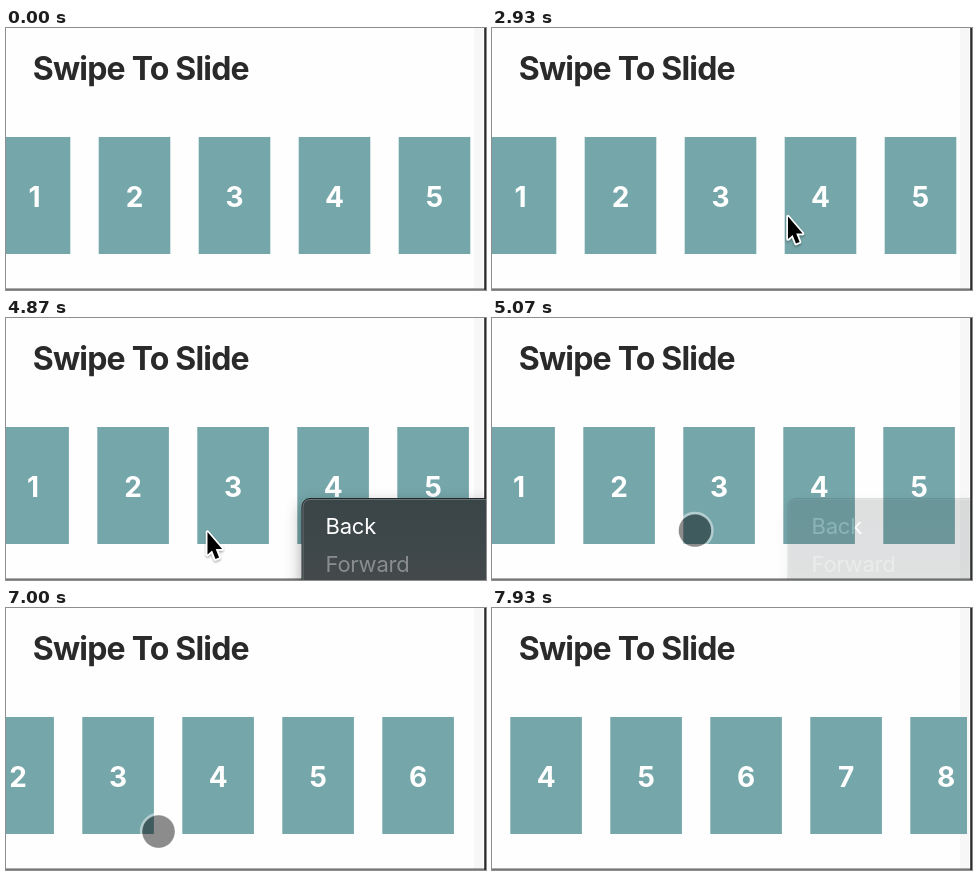
An HTML page that plays this animation: 480x262 px, repeating every 8000 ms.

```html
<!DOCTYPE html>
<html lang="en">
<head>
<meta charset="utf-8">
<title>Swipe To Slide</title>
<style>
  html, body { margin: 0; width: 100%; height: 100%; overflow: hidden; background: #fefefe; }
  svg { display: block; width: 480px; height: 262px; }
  text { font-family: Inter, Roboto, "Open Sans", sans-serif; font-optical-sizing: none; }
  .title { font-size: 32px; font-weight: 700; letter-spacing: -0.025em; fill: #2a2a2a; }
  .card rect { fill: #75a6a9; }
  .card text { font-size: 28px; font-weight: 700; fill: #fff; text-anchor: middle; }
  .menu text { font-size: 22px; letter-spacing: -0.01em; }
</style>
</head>
<body>
<svg viewBox="0 0 480 262">
  <defs>
    <clipPath id="view"><rect width="475" height="262"/></clipPath>
    <linearGradient id="glass" x1="0" y1="0" x2="0" y2="1">
      <stop offset="0" stop-color="#3a4547"/>
      <stop offset=".45" stop-color="#3f484a"/>
      <stop offset="1" stop-color="#4b4d4f"/>
    </linearGradient>
    <filter id="soft" x="-20%" y="-30%" width="140%" height="160%">
      <feGaussianBlur stdDeviation="8"/>
    </filter>
    <filter id="drop" x="-50%" y="-50%" width="200%" height="200%">
      <feDropShadow dx="0" dy="1.5" stdDeviation="1.3" flood-opacity=".35"/>
    </filter>
  </defs>
  <rect width="480" height="262" fill="#fefefe"/>
  <rect x="468" width="9" height="261" fill="#f7f7f7"/>
  <text class="title" x="26.8" y="51.7">Swipe To Slide</text>
  <g clip-path="url(#view)"><g id="cards"></g></g>
  <rect y="260.4" width="480" height="1.6" fill="#777"/>
  <rect x="478.2" width="1.8" height="262" fill="#2c2c2c"/>

  <g id="menu" class="menu">
    <rect x="295" y="186" width="220" height="120" rx="8" opacity=".33" filter="url(#soft)"/>
    <rect x="296" y="180.5" width="220" height="120" rx="8" fill="url(#glass)" stroke="#222829"/>
    <rect x="297" y="181.5" width="220" height="120" rx="7" fill="none" stroke="#7d8586" stroke-opacity=".7"/>
    <text x="319.5" y="216.4" fill="#fff">Back</text>
    <text x="319.5" y="253.7" fill="#8a8d8e">Forward</text>
  </g>

  <g id="touch">
    <circle r="16.5" fill-opacity=".45"/>
    <circle r="17.4" fill="none" stroke="#fff" stroke-opacity=".45" stroke-width="2.6"/>
  </g>
  <path id="arrow" d="M0 0V22.6L4.6 18.4L8 27L11.6 25.4L8.2 17H14.6Z"
        stroke="#fff" stroke-width="3.4" stroke-linejoin="round" paint-order="stroke" filter="url(#drop)"/>
</svg>
<script>
  const LOOP = 8000, FPS = 15, PITCH = 100;
  const [cards, menu, touch, arrow] =
    ['cards', 'menu', 'touch', 'arrow'].map(id => document.getElementById(id));

  cards.innerHTML = Array.from({ length: 9 }, (_, i) =>
    `<g class="card" transform="translate(${i * PITCH})">
       <rect y="109" width="71.6" height="117"/><text x="35.8" y="178.8">${i + 1}</text>
     </g>`).join('');

  // Smooth 0 to 1 between two times
  function glide(t, from, to) {
    const k = Math.min(1, Math.max(0, (t - from) / (to - from)));
    return k * k * (3 - 2 * k);
  }
  const within = (t, from, to) => t >= from && t < to;
  const show = (el, on) => { el.style.visibility = on ? 'visible' : 'hidden'; };
  const place = (el, x, y = 0) => el.setAttribute('transform', `translate(${x} ${y})`);

  function drawArrow(t) {
    const enter = glide(t, 400, 733), aim = glide(t, 867, 1200), leave = glide(t, 4133, 4533);
    place(arrow, 350 - 22 * enter - 32 * aim - 94.5 * leave,
                 275 - 75 * enter - 11.5 * aim + 25.5 * leave);
    show(arrow, within(t, 460, 3200) || within(t, 4130, 5000));
  }

  // The finger pulls the cards along, drifting down as it goes left
  function drawTouch(t, drag) {
    const press = within(t, 3200, 4130);
    if (press) place(touch, 297.3, 190.5);
    else place(touch, 203 + 64.5 * glide(t, 5200, 5400) - drag, 212.5 + drag * 0.096);
    show(touch, press || within(t, 5000, 7860));
  }

  function draw(now) {
    const frame = Math.floor((now % LOOP) * FPS / 1000 + 0.1);
    const t = frame * 1000 / FPS;
    const drag = 177.2 * glide(t, 6800, 7133) + 95.8 * glide(t, 7333, 7933);

    place(cards, -7.3 - 1.4 * glide(t, 3133, 3733) - drag);
    drawArrow(t);
    drawTouch(t, drag);
    show(menu, within(t, 4130, 5130));
    menu.style.opacity = 1 - glide(t, 4867, 5133);
  }

  const start = performance.now();
  function tick() {
    draw(performance.now() - start);
    requestAnimationFrame(tick);
  }
  tick();
</script>
</body>
</html>
```
